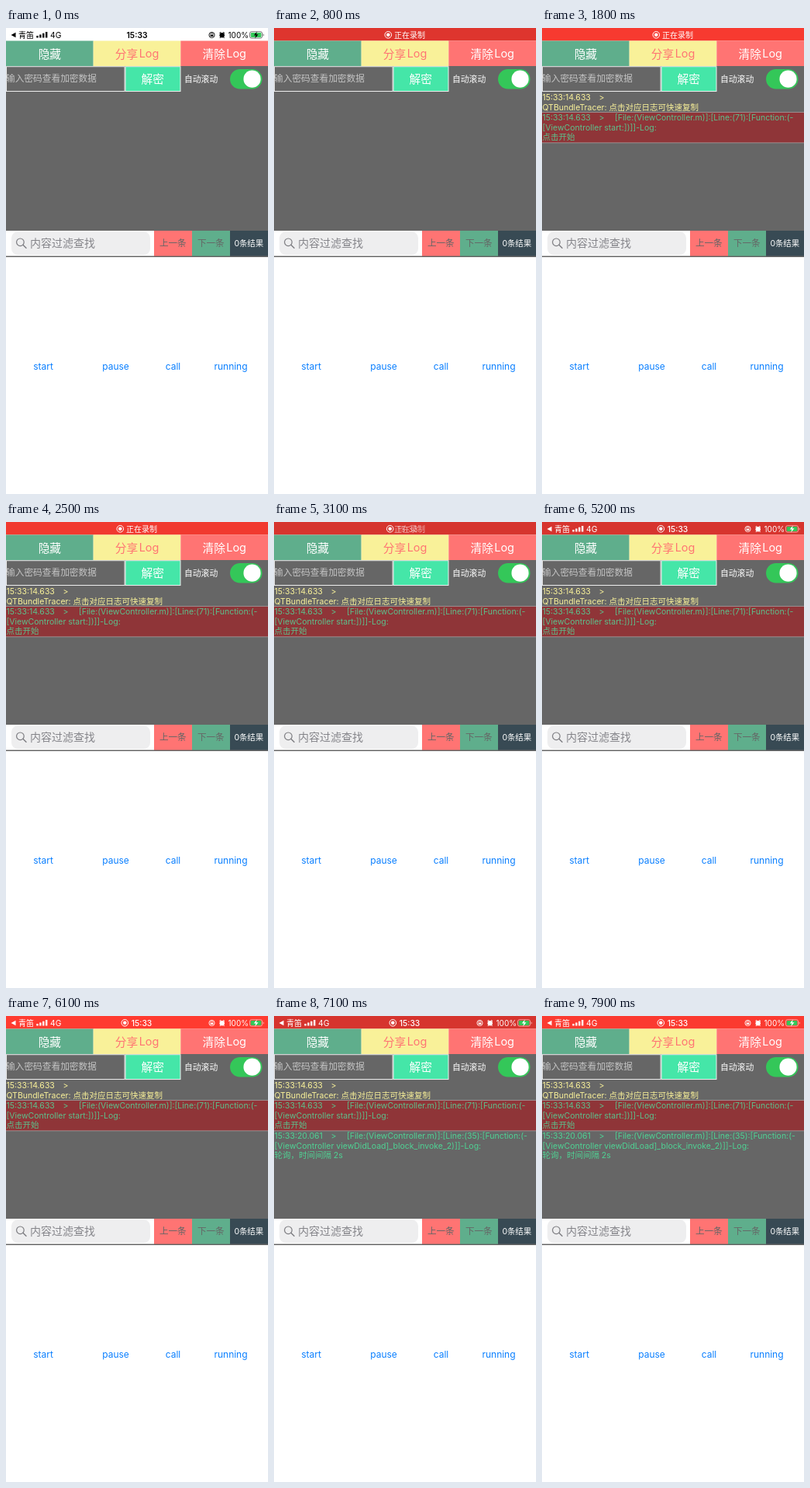
These frames come from a looping animation (338x600 px, 8 s). An HTML page:

```html
<!DOCTYPE html>
<html lang="zh-CN">
<head>
<meta charset="utf-8">
<title>Log panel</title>
<style>
  html, body { margin: 0; width: 100%; height: 100%; overflow: hidden; background: #fff; }
  svg { display: block; width: 338px; height: 600px; }
  text { font-family: Inter, 'Noto Sans CJK SC', 'Noto Sans CJK', sans-serif; fill: currentColor; white-space: pre; }
  .mid { text-anchor: middle; }
</style>
</head>
<body>
<svg id="stage" viewBox="0 0 338 600">
  <rect width="338" height="600" fill="#fff"/>
  <rect id="bar" width="338" height="16.5"/>

  <g id="status">
    <g id="sides">
      <path d="M6.5 9 L12.5 5.8 V12.2 Z" fill="currentColor"/>
      <text x="16" y="12.6" font-size="10">青笛</text>
      <path d="M40.5 10V12.6M44.4 8.6V12.6M48.3 6.8V12.6M52.2 5V12.6" stroke="currentColor" stroke-width="2.4"/>
      <text x="57" y="12.7" font-size="10.3">4G</text>
      <g fill="none" stroke="currentColor">
        <circle cx="265.5" cy="9" r="3.6" stroke-width=".9"/>
        <path d="M264.2 8.8V7.6a1.3 1.3 0 0 1 2.6 0V8.8" stroke-width=".8"/>
        <path d="M263.7 8.7h3.6v2.3h-3.6z" fill="currentColor" stroke="none"/>
        <path d="M275.6 6.6l1.5-1.3M281.8 6.6l-1.5-1.3M276.6 12.2l-.7.7M280.8 12.2l.7.7" stroke-width="1.1"/>
      </g>
      <circle cx="278.7" cy="9.2" r="3.2" fill="currentColor"/>
      <text x="286.5" y="12.6" font-size="10">100%</text>
      <rect x="314.5" y="4.7" width="16" height="8.4" rx="2.3" fill="none" stroke="currentColor" stroke-opacity=".6" stroke-width=".9"/>
      <rect x="315.7" y="5.9" width="13.6" height="6" rx="1.2" fill="#34c759"/>
      <path d="M331.7 7.4v3a1.6 1.6 0 0 0 0-3z" fill="currentColor" opacity=".6"/>
      <path d="M323.8 4.4l-4.1 5.1h2.6l-1.1 3.9 4.3-5.2h-2.7z" fill="currentColor"/>
    </g>
    <text id="clock" y="12.8" font-size="10.3">15:33</text>
    <text id="notice" x="155" y="12.6" font-size="10">正在录制</text>
    <g id="dot">
      <circle cy="8.8" r="4.3" fill="none" stroke="currentColor"/>
      <circle cy="8.8" r="2.3" fill="currentColor"/>
    </g>
  </g>

  <rect y="49" width="338" height="246" fill="#666"/>
  <g id="tabs"></g>

  <rect x=".5" y="49.7" width="152.6" height="31.8" fill="none" stroke="#eee"/>
  <rect x="154" y="49.7" width="71" height="31.8" fill="#45e6a8" stroke="#eee"/>
  <rect x="289" y="53" width="41.5" height="25.5" rx="12.75" fill="#34c759"/>
  <circle cx="317.5" cy="66.2" r="11.2" fill="#239b40" opacity=".25"/>
  <circle cx="317.5" cy="65.7" r="11.1" fill="#fff"/>

  <g id="logs"></g>

  <rect y="261" width="191" height="32.5" fill="#fff"/>
  <rect x="7" y="262.5" width="179" height="29.5" rx="8" fill="#eeeeef"/>
  <path d="M22.2 279.6L26 283.3" stroke="#7c7c80" stroke-width="1.4" stroke-linecap="round"/>
  <circle cx="18.4" cy="275.8" r="4.8" fill="none" stroke="#7c7c80" stroke-width="1.2"/>
  <g id="labels"></g>
</svg>
<script>
const NS = 'http://www.w3.org/2000/svg';
const byId = id => document.getElementById(id);
const LOOP = 8000, STEP = 100;

function add(parent, tag, attrs, content) {
  const el = document.createElementNS(NS, tag);
  for (const key in attrs) el.setAttribute(key, attrs[key]);
  if (content) el.textContent = content;
  parent.appendChild(el);
  return el;
}

function label(parent, x, y, size, color, content, centered) {
  add(parent, 'text', { x, y, 'font-size': size, color, class: centered ? 'mid' : '' }, content);
}

function box(parent, x, y, width, height, fill) {
  return add(parent, 'rect', { x, y, width, height, fill });
}

const GREEN = '#5fae8c', YELLOW = '#f9f199', RED = '#ff7473', GRAY = '#666';
const tabs = byId('tabs'), labels = byId('labels'), logs = byId('logs');

const TAB = 338 / 3;
[[GREEN, '#fff', '隐藏'], [YELLOW, RED, '分享 Log'], [RED, '#fff', '清除 Log']].forEach(([fill, color, name], i) => {
  const x = i * TAB;
  box(tabs, x, 16.5, TAB, 32.5, fill);
  const [word, tail] = name.split(' ');
  if (tail) {
    label(tabs, x + 28.2, 38.6, 14.7, color, word);
    label(tabs, x + 59, 38.4, 14.4, color, tail);
  } else label(tabs, x + TAB / 2, 38.6, 14.7, color, word, true);
});

label(labels, 0, 69.3, 11.7, '#c4c4c4', '输入密码查看加密数据');
label(labels, 189.3, 71.2, 14.7, '#fff', '解密', true);
label(labels, 230, 69.6, 10.8, '#fff', '自动滚动');
label(labels, 31, 282, 14, '#85858a', '内容过滤查找');

[[191, RED, GRAY, '上一条', 11.6],
 [240, GREEN, GRAY, '下一条', 11.6],
 [289, '#384a54', '#fff', '0条结果', 10.4]].forEach(([x, fill, color, name, size]) => {
  box(labels, x, 261, 49, 32.5, fill);
  label(labels, x + 24.3, 281.3, size, color, name, true);
});

[[48, 'start'], [141.5, 'pause'], [215.5, 'call'], [290, 'running']]
  .forEach(([x, name]) => label(labels, x, 440, 12, '#0a7fff', name, true));

// One log cell: time stamp, optional text beside it, then further lines.
function entry(at, y, color, stamp, side, lines) {
  const g = add(logs, 'g', {});
  const put = (x, row, content) => label(g, x, y + row * 12.5, 10.5, color, content);
  put(.4, 0, stamp);
  put(73.5, 0, '>');
  if (side) put(94, 0, side);
  lines.forEach((line, i) => put(.4, i + 1, line));
  return { at, g };
}

const where = line => `[File:(ViewController.m)]:[Line:(${line}):[Function:(-`;
const cell = box(logs, 0, 108.5, 338, 39.5, '#8f3538');
const rules = [108, 147.5].map(y => box(logs, 0, y, 338, .7, '#a9a9a9'));
const START = 1100, POLL = 6600;
const entries = [
  entry(START, 93, YELLOW, '15:33:14.633', '', ['QTBundleTracer: 点击对应日志可快速复制']),
  entry(START, 119, '#5cc08c', '15:33:14.633', where(71),
    ['[ViewController start:])]]-Log:', '点击开始']),
  entry(POLL, 158.3, '#4fd394', '15:33:20.061', where(35),
    ['[ViewController viewDidLoad]_block_invoke_2)]]-Log:', '轮询，时间间隔 2s']),
  ...[cell, ...rules].map(g => ({ at: START, g }))
];

const RECORD = 100;
const ramp = (t, from, to) => Math.min(1, Math.max(0, (t - from) / (to - from)));
const mix = (a, b, k) => `rgb(${a.map((v, i) => Math.round(v + (b[i] - v) * k))})`;

function draw(t) {
  const live = t >= RECORD;
  const swap = ramp(t, 3000, 3250);
  const glow = (1 - Math.cos((t - RECORD) / 1000 * Math.PI)) / 2;
  const clock = byId('clock');

  byId('bar').setAttribute('fill', live ? mix([255, 59, 48], [214, 52, 46], glow) : '#fff');
  byId('status').style.color = live ? '#fff' : '#000';
  byId('sides').style.opacity = live ? ramp(t, 3100, 3400) : 1;
  clock.style.opacity = live ? swap : 1;
  clock.style.fontWeight = live ? 500 : 600;
  clock.setAttribute('x', live ? 157.5 + 4.3 * swap : 155.5);
  byId('notice').style.opacity = live ? 1 - swap : 0;
  byId('dot').style.opacity = live ? 1 : 0;
  byId('dot').setAttribute('transform', `translate(${147.3 + 6 * swap} 0)`);
  entries.forEach(({ at, g }) => { g.style.display = t >= at ? '' : 'none'; });
}

const begin = performance.now();
function tick() {
  const t = Math.max(0, performance.now() - begin) % LOOP;
  draw(Math.floor(t / STEP) * STEP);
  requestAnimationFrame(tick);
}
tick();
</script>
</body>
</html>
```
